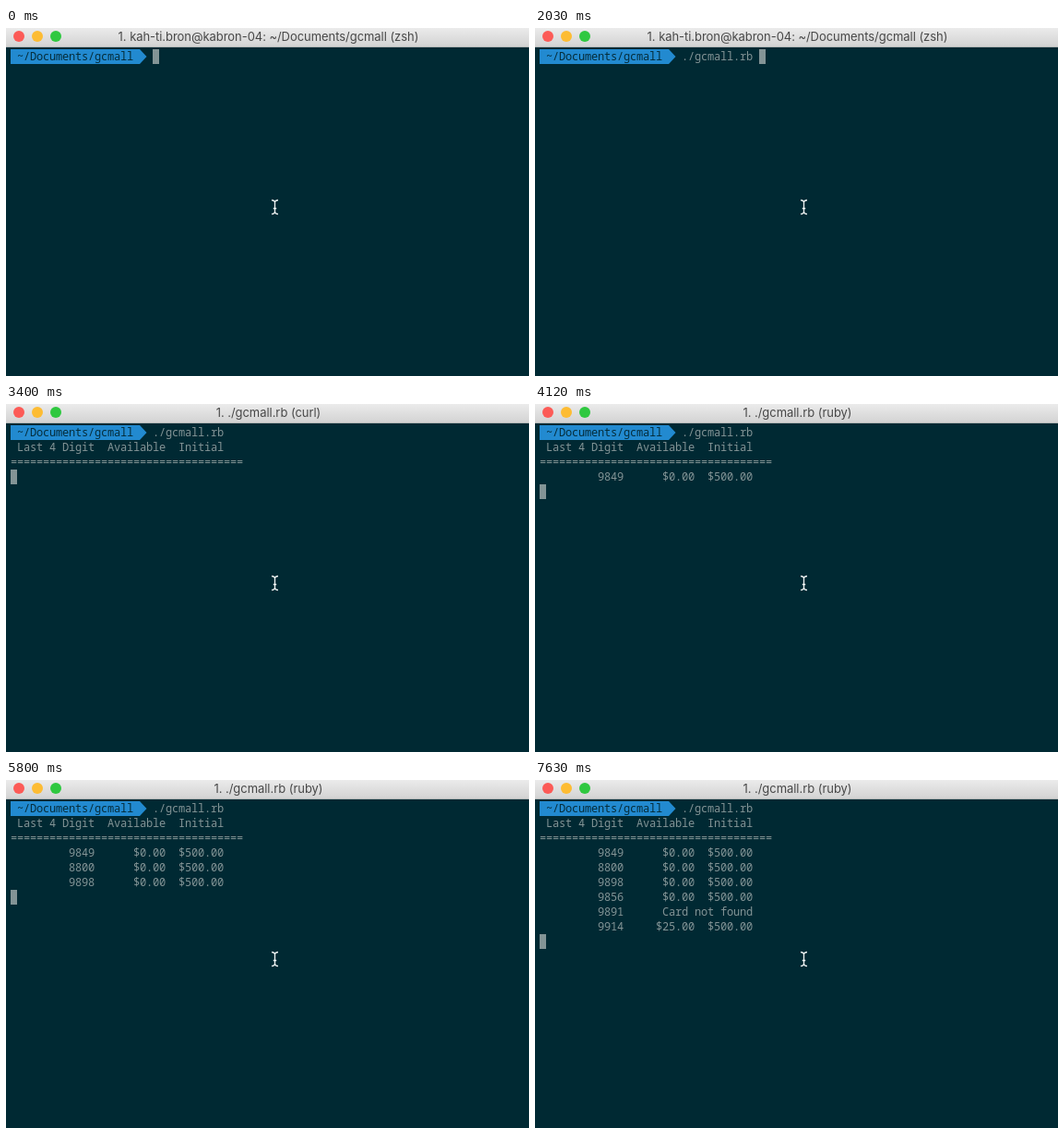
Recreate the animation shown at these times as an HTML page. Size 567 px wide and 377 px high, loop 8 s.

```html
<!DOCTYPE html>
<html lang="en">
<head>
<meta charset="utf-8">
<title>Terminal</title>
<style>
  html, body { margin: 0; width: 100%; height: 100%; overflow: hidden; background: #002933; }
  svg { display: block; width: 567px; height: 377px; }
  .term { font: 12px "Noto Sans Mono", "DejaVu Sans Mono", monospace; letter-spacing: -0.2px; fill: #839496; white-space: pre; }
  .path { fill: #052d3b; }
  .title { font: 13px Inter, Roboto, sans-serif; letter-spacing: -0.05px; fill: #484848; text-anchor: middle; }
</style>
</head>
<body>
<svg viewBox="0 0 567 377" xmlns="http://www.w3.org/2000/svg">
  <defs>
    <linearGradient id="bar" x1="0" y1="0" x2="0" y2="1">
      <stop offset="0" stop-color="#ebebeb"/>
      <stop offset="1" stop-color="#d3d3d3"/>
    </linearGradient>
  </defs>
  <rect width="567" height="377" fill="#002933"/>
  <rect width="567" height="20" fill="url(#bar)"/>
  <rect y="20" width="567" height="1" fill="#b4b6b6"/>
  <circle cx="14" cy="9" r="6" fill="#fc5b57"/>
  <circle cx="34" cy="9" r="6" fill="#fdbc33"/>
  <circle cx="54" cy="9" r="6" fill="#2fc840"/>
  <text id="title" class="title" x="284.5" y="14"></text>

  <path d="M5 23H145L152.5 31L145 39H5Z" fill="#228ad0"/>
  <text class="term path" x="12" y="35">~/Documents/gcmall</text>
  <text id="command" class="term" x="159" y="35"></text>
  <g id="output"></g>
  <rect id="cursor" width="7" height="16" fill="#839496"/>

  <path d="M288 186.5Q291.5 186.5 291.5 189.5Q291.5 186.5 295 186.5M291.5 189V199M288 201.5Q291.5 201.5 291.5 198.5Q291.5 201.5 295 201.5M289.8 195.5H293.2"
        fill="none" stroke="#f2f5f5" stroke-width="1.3"/>
</svg>
<script>
  const LOOP = 8000, LEFT = 5, TOP = 23, COL = 7, ROW = 16, PROMPT_COLS = 22;
  const $ = id => document.getElementById(id);

  const job = name => `1. ./gcmall.rb (${name})`;
  const shell = '1. kah-ti.bron@kabron-04: ~/Documents/gcmall (zsh)';
  const card = (digits, left) =>
    digits.padStart(13) + (left ? left.padStart(11) + '$500.00'.padStart(9) : 'Card not found'.padStart(20));

  // Each entry is [start time, value].
  const titles = [
    [0, shell], [2470, job('ruby')], [3400, job('curl')], [4120, job('ruby')],
    [6500, job('curl')], [7030, job('ruby')]
  ];
  const typing = [
    [0, ''], [770, '.'], [830, './'], [1610, './g'], [1730, './gc'], [2030, './gcmall.rb ']
  ];
  const lines = [
    [2540, ' Last 4 Digit  Available  Initial'],
    [2620, '='.repeat(36)],
    [3640, card('9849', '$0.00')],
    [4840, card('8800', '$0.00')],
    [5800, card('9898', '$0.00')],
    [6390, card('9856', '$0.00')],
    [6850, card('9891')],
    [7630, card('9914', '$25.00')]
  ];
  const ENTER = 2390;

  const rows = lines.map(([, text], i) => {
    const row = document.createElementNS('http://www.w3.org/2000/svg', 'text');
    row.setAttribute('class', 'term');
    row.setAttribute('x', LEFT);
    row.setAttribute('y', TOP + 12 + ROW * (i + 1));
    row.textContent = text;
    $('output').append(row);
    return row;
  });

  const valueAt = (track, t) => track.filter(([start]) => start <= t).pop()[1];

  function setText(el, text) {
    if (el.textContent !== text) el.textContent = text;
  }

  function draw(t) {
    const command = valueAt(typing, t);
    const shown = lines.filter(([start]) => start <= t).length;
    const entered = t >= ENTER;
    setText($('title'), valueAt(titles, t));
    setText($('command'), command);
    rows.forEach((row, i) => row.setAttribute('visibility', i < shown ? 'visible' : 'hidden'));
    $('cursor').setAttribute('x', LEFT + COL * (entered ? 0 : PROMPT_COLS + command.length));
    $('cursor').setAttribute('y', TOP + ROW * (entered ? shown + 1 : 0));
  }

  const begin = performance.now();
  function tick() {
    draw((performance.now() - begin) % LOOP);
    requestAnimationFrame(tick);
  }
  draw(0);
  requestAnimationFrame(tick);
</script>
</body>
</html>
```
